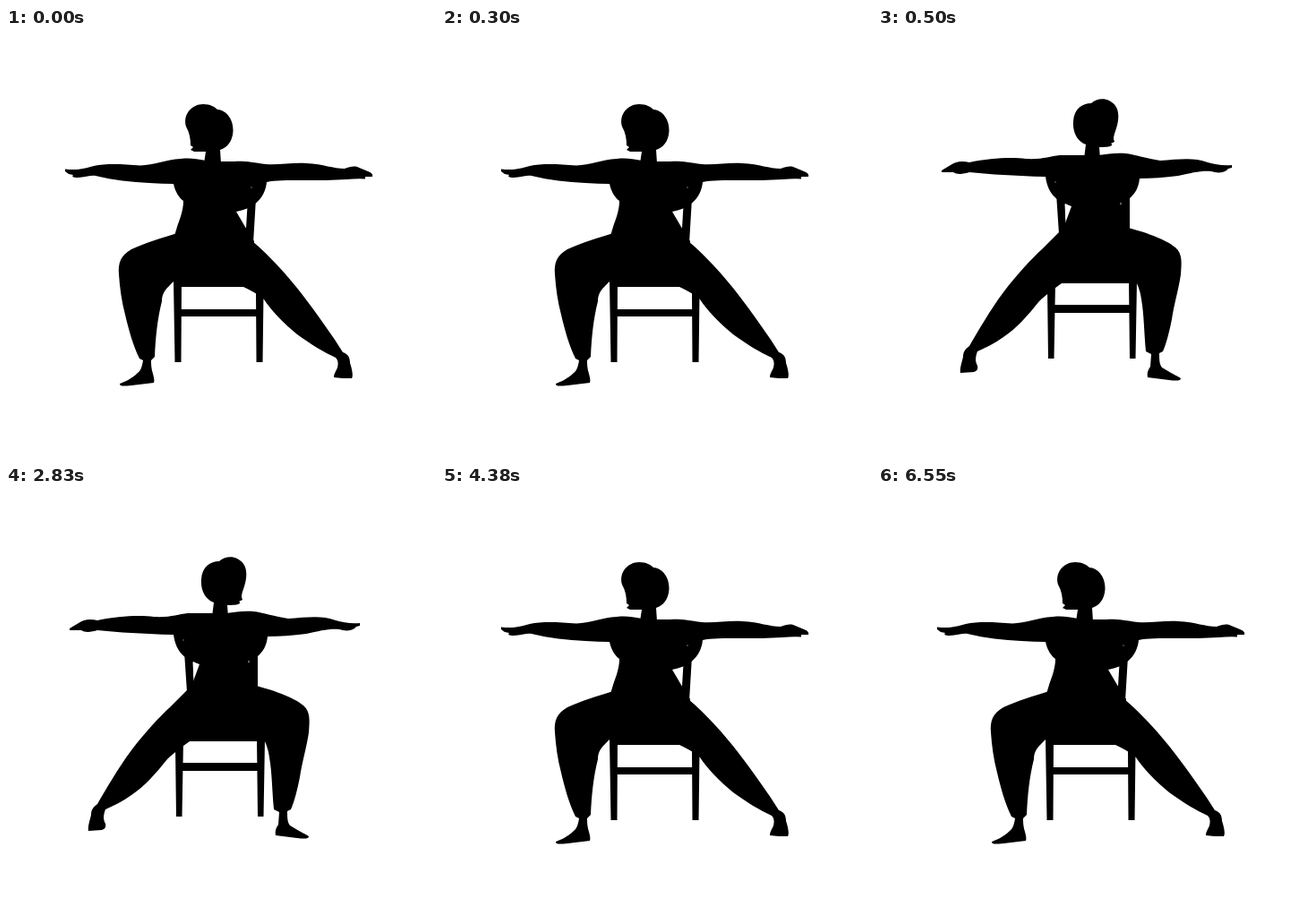
Write an HTML page that moves like this. It is 480x480 px and loops after 8 s.

```html
<!DOCTYPE html>
<html lang="en">
<head>
<meta charset="utf-8">
<title>Seated warrior pose</title>
<style>
  html, body { margin: 0; width: 100%; height: 100%; overflow: hidden; background: #fff; }
  svg { display: block; width: 100%; height: 100%; }
  .gap { fill: #fff; }
</style>
</head>
<body>
<svg viewBox="0 0 480 480">
  <g id="facing-left">
    <!-- head and neck -->
    <path d="M201 110C197 96 208 85 220 85C228 85 233 88 236 91C247 92 254 103 253.500 115C253 127 246 134 239 136L240 151H221L223 138H210L206 136L209 133L206 131C206 124 205 117 201 110Z"/>
    <!-- arms and torso -->
    <path d="M223 148C212 146 206 145 195 146C178 147 165 153 150 153.500C130 152 112 151 98 154C88 157 80 159 66 157.500L66 160L70 163L75 164C73 166 75 167 80 167C88 167 95 164 100 165C120 170 140 172 160 173Q175 174 187 174C189 184 194 190 198 193C198 205 193 215 191 222L188 232V284H275L277 238L267 222L257 205C274 202 289 192 291 172C300 170 315 170 330 170C350 170 365 170 380 169Q392 168 401 168.500V166H409C410 163 407 161 404 160L392 155C388 154 383 155 378 157C365 157 355 152 335 151C320 150 305 153 290 152C275 150 265 148 255 149H239Z"/>
    <!-- legs -->
    <path d="M191 229C175 234 155 240 140 247C128 254 125 262 126 275C127 290 129 305 133 320C137 337 142 355 149 369L153 371C152 378 150 383 147 385C140 392 132 395 127 397C127 400 130 400 140 399L165 396C166 393 165 390 164 386C162 380 162 375 162 371L166 367C167 345 169 325 174 305C174 295 179 291 187 283L190 289H265C275 294 283 298 288 303C296 315 310 330 325 342C340 353 355 362 368 368C371 371 371 375 370 379C368 384 366 386 366 390C372 391 380 391 386 391C388 388 386 380 384 374C384 368 382 364 376 362C365 344 347 319 331 298C315 277 295 255 275 238Z"/>
    <!-- chair -->
    <path d="M270 190H279L276 240H267ZM187 282H196L195.500 373H188.500ZM279 295H287.500L286.500 373H279.500ZM193 314H282V322H193Z"/>
    <circle class="gap" cx="274" cy="178" r=".8" opacity=".5"/>
  </g>
  <g id="facing-right">
    <path d="M218 104C219 90 228 84 238 84C243 79 252 78 258 81C268 86 269 95 268 103C267 112 263 118 263 124L264 127L260 129C264 131 258 133 252 133L247 133L248 146H230L232 130C223 127 217 117 218 104Z"/>
    <path d="M232 142C220 142 212 142 203 142C192 143 184 147 165 146C150 144 125 145 102 150C93 148 87 149 81 153L71 159V161L84 161C88 164 96 163 102 161C120 163 140 164 160 165Q175 166 187 166C189 180 195 193 216 199L209 218L203 228V284H281V190C287 185 291 178 292 168C305 168 320 167 335 165C350 162 360 159 372 160C378 162 385 162 389 159L391 157L395 156V153C384 154 376 152 368 150C352 144 335 147 315 148C300 146 287 141 276 140C265 139 256 141 246 142Z"/>
    <path d="M279 223C295 227 320 235 332 245C340 252 339 262 338 275C336 290 330 310 328 325C325 340 322 352 318 361L314 363C314 370 314 375 317 379C325 384 333 388 338 391C338 394 333 394 325 393L301 390C300 386 301 382 304 378L305 364L299 361C297 340 297 320 294 303C293 295 291 290 289 285H205C198 290 187 298 180 305C168 320 155 335 140 345C130 352 120 357 111 361C109 366 108 372 111 377C112 381 110 383 107 384L92 385C91 380 94 372 95 367C95 361 98 358 102 355C112 338 125 315 140 295C155 275 172 257 183 247L203 227Z"/>
    <path d="M199 185H208L210 230H202ZM189 289L198 283L196.500 369H190ZM280 282H289L287.500 369H281ZM193 309H284V318H193Z"/>
    <path class="gap" d="M209 196L215 199L209 214Z"/>
    <circle class="gap" cx="198" cy="172" r=".8" opacity=".5"/>
    <ellipse class="gap" cx="271" cy="196" rx=".7" ry="1.6" opacity=".6"/>
  </g>
</svg>
<script>
const LOOP = 8000, TURN = 500, RETURN = 4380;

// Shows a pose as a run of hard cuts.
function cut(id, steps) {
  const frames = steps.map(([time, opacity]) =>
    ({ opacity, offset: time / LOOP, easing: "steps(1, end)" }));
  document.getElementById(id).animate(frames, { duration: LOOP, iterations: Infinity });
}

cut("facing-left", [[0, 1], [TURN, 0], [RETURN, 1], [LOOP, 1]]);
cut("facing-right", [[0, 0], [TURN, 1], [RETURN, 0], [LOOP, 0]]);
</script>
</body>
</html>
```
